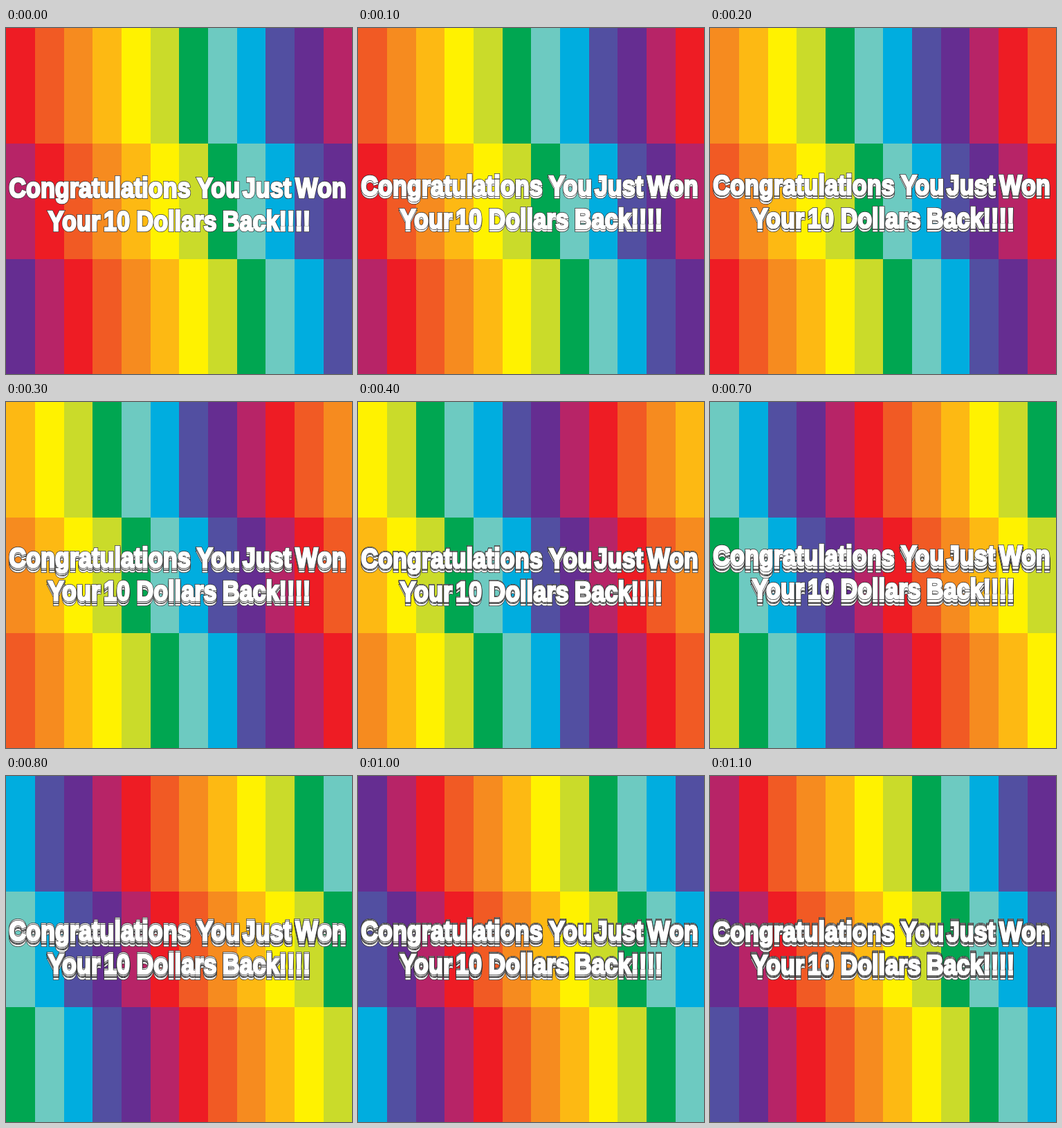
Write an HTML page that moves like this. It is 500x500 px and loops after 1.2 s.

```html
<!DOCTYPE html>
<html lang="en">
<head>
<meta charset="utf-8">
<title>Congratulations</title>
<style>
  html, body { margin: 0; width: 100%; height: 100%; overflow: hidden; }
  svg { display: block; width: 100vw; height: 100vh; }
  text {
    font: bold 41px "Liberation Sans", Arial, sans-serif;
    text-anchor: middle;
    stroke-linejoin: miter;
    stroke-miterlimit: 3;
  }
  .edge { fill: #333; stroke: #333; stroke-width: 4.2px; }
  .face { fill: #fff; stroke: #fff; stroke-width: 2.7px; }
</style>
</head>
<body>
<svg id="stage" viewBox="0 0 500 500"></svg>
<script>
const NS = "http://www.w3.org/2000/svg";
const STEP_MS = 100;
const COLORS = [
  "#ee1c24", "#f15a24", "#f68b1f", "#fdb913", "#fff200", "#cadb2a",
  "#00a651", "#6dcac1", "#00addf", "#524fa1", "#652d91", "#b72467"
];
const COUNT = COLORS.length;
const ROWS = 3;
// Each word is centred on its x.
const LINES = [
  { y: 245, words: { Congratulations: 135.5, You: 307, Just: 377, Won: 455 } },
  { y: 292.5, words: { Your: 98.5, 10: 160, Dollars: 246.5, "Back!!!!": 376.5 } }
];
const CONDENSE = 0.835;
// Each step stamps another copy of the text over the earlier ones.
const LIFTS = [0, 3, 4, 6, 5, 6, 5, 9, 7, 8, 7, 6];

const stage = document.getElementById("stage");

function add(parent, tag, attrs = {}) {
  const node = document.createElementNS(NS, tag);
  for (const [key, value] of Object.entries(attrs)) node.setAttribute(key, value);
  return parent.appendChild(node);
}

const edge = (i, parts) => Math.ceil(i * 500 / parts);

const tiles = [];
for (let row = 0; row < ROWS; row++) {
  for (let col = 0; col < COUNT; col++) {
    const x = edge(col, COUNT), y = edge(row, ROWS);
    const node = add(stage, "rect", {
      x, y,
      width: edge(col + 1, COUNT) - x,
      height: edge(row + 1, ROWS) - y,
      "shape-rendering": "crispEdges"
    });
    tiles.push({ node, offset: col - row + COUNT });
  }
}

const stamps = LIFTS.map(lift => {
  const group = add(stage, "g");
  for (const layer of ["edge", "face"]) {
    for (const { y, words } of LINES) {
      for (const [word, x] of Object.entries(words)) {
        add(group, "text", {
          class: layer,
          transform: `translate(${x} ${y - lift}) scale(${CONDENSE} 1)`
        }).textContent = word;
      }
    }
  }
  return group;
});

function render(time) {
  const step = Math.floor(time / STEP_MS) % COUNT;
  for (const { node, offset } of tiles) {
    node.setAttribute("fill", COLORS[(offset + step) % COUNT]);
  }
  stamps.forEach((group, i) => {
    group.setAttribute("visibility", i <= step ? "visible" : "hidden");
  });
}

const start = performance.now();
function tick() {
  render(performance.now() - start);
  requestAnimationFrame(tick);
}
tick();
</script>
</body>
</html>
```
